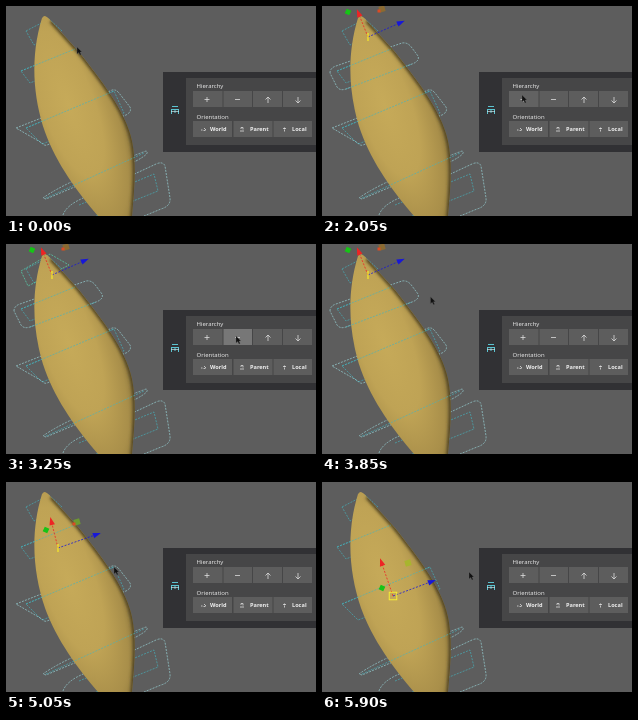
An HTML page for the animation above (6.05 s loop, 310 by 210 pixels).

```html
<!DOCTYPE html>
<html lang="en">
<head>
<meta charset="utf-8">
<title>Rig controls</title>
<style>
  html, body { margin: 0; width: 100%; height: 100%; overflow: hidden; background: #5d5d5d; }
  svg { display: block; width: 310px; height: 210px; }
  text { font: 6px "Open Sans", "Noto Sans", sans-serif; fill: #f0f0f0; }
  .label { font-weight: 700; font-size: 5.6px; }
  .ring { fill: none; stroke: #45b4bf; stroke-width: .65; stroke-dasharray: 2 1.2; }
  .outer { stroke: #9cdce0; }
  .selected { stroke: #55e0b8; }
  .icon { fill: none; stroke: #dcdcdc; stroke-width: .8; }
</style>
</head>
<body>
<svg viewBox="0 0 310 210">
  <defs>
    <radialGradient id="skin" gradientUnits="userSpaceOnUse" cx="0" cy="0" r="1"
      gradientTransform="translate(62 98) rotate(-20) scale(58 170)">
      <stop offset="0" stop-color="#c6aa59"/>
      <stop offset=".45" stop-color="#bfa355"/>
      <stop offset=".75" stop-color="#a98f4a"/>
      <stop offset="1" stop-color="#7a6735"/>
    </radialGradient>
    <clipPath id="body">
      <path id="shape" d="M38 10Q41 10 45 15L73 46C94 73 120 105 126 135C131 160 128 186 126 210H92C72 187 50 157 39 126C27 91 24 51 36 12Z"/>
    </clipPath>
    <filter id="soft"><feGaussianBlur stdDeviation="1.6"/></filter>
  </defs>
  <rect width="310" height="210" fill="#5d5d5d"/>

  <g class="ring">
    <path d="M20 25L43 13L56 25L28 39Z"/>
    <path d="M15 65L69 43L78 55L24 77Z"/>
    <path d="M20 122L108 85L118 107L36 138Z"/>
    <path d="M73 199L148 168L152 185L85 212"/>
  </g>
  <g class="ring outer">
    <path class="wide1 selected" d="M15 27L44 10L63 21L22 42Z"/>
    <path class="wide2" d="M8 67Q8 62 14 60L80 37Q86 36 90 42L96 50Q98 55 90 58L24 83Q18 85 15 81Z"/>
    <path class="wide3" d="M10 122L104 85Q109 82 113 87L124 101Q126 106 120 109L41 139Q38 140 36 137Z"/>
    <path d="M57 209Q60 200 75 193L150 158Q157 155 159 160L164 192Q165 200 155 203L138 210"/>
    <path d="M37 192Q60 175 140 145Q145 147 130 155L40 193Z"/>
  </g>

  <use href="#shape" fill="url(#skin)"/>
  <g clip-path="url(#body)">
    <path d="M45 15L73 46C94 73 120 105 126 135C131 160 128 186 126 215" fill="none" stroke="#4f4322" stroke-width="4" filter="url(#soft)"/>
  </g>

  <g class="ring">
    <path d="M15 65L69 43M20 122L108 85M40 192L138 147"/>
    <path class="wide2" d="M24 83L90 58"/>
  </g>

  <rect x="157" y="66" width="153" height="80" fill="#313134"/>
  <rect x="180" y="72" width="130" height="67" fill="#464647"/>
  <g fill="none" stroke="#5cc3d0">
    <path d="M166 100.500H172M165 103.500H173M165.500 104V108M169 104V107M172.500 104V108"/>
    <path d="M165 105.500H173" stroke="#c8e6e8" stroke-width=".7"/>
  </g>
  <text x="190.500" y="82">Hierarchy</text>
  <text x="190.500" y="113">Orientation</text>
  <g id="buttons"></g>

  <g id="gizmo" fill="none"></g>
  <path id="cursor" d="M0 0V7L1.700 5.500L3 8L4.200 7.400L3 5H5Z" fill="#111" stroke="#666" stroke-width=".3"/>
</svg>
<script>
const LOOP = 6050;
const $ = id => document.getElementById(id);

const button = (x, y, w, content) =>
  `<rect x="${x}" y="${y}" width="${w}" height="16" fill="#5d5d5d"/>${content}`;
const icon = d => `<path class="icon" d="${d}"/>`;
$('buttons').innerHTML =
  button(187, 85, 29.5, icon('M198.500 93.500h5M201 91v5')) +
  button(217.5, 85, 28.5, icon('M229 93.500h5')) +
  button(247, 85, 29, icon('M262 97v-6M259.500 93.500l2.500-2.500 2.500 2.500')) +
  button(277, 85, 29, icon('M292 91v6M289.500 94.500l2.500 2.500 2.500-2.500')) +
  button(187, 115, 39, icon('M195 124h1.500M198 122l2 2M197.500 124.500h2') + '<text class="label" x="204" y="125.200">World</text>') +
  button(227.5, 115, 39, icon('M234 125h4M235 123v-1.500h2v2') + '<text class="label" x="244" y="125.200">Parent</text>') +
  button(267.5, 115, 38.5, icon('M278.500 121.500v2M278.500 124v1.500M277 122.500h3') + '<text class="label" x="286" y="125.200">Local</text>');
const [plus, minus, , , world] = $('buttons').querySelectorAll('rect');

// Handle tips are offsets from the gizmo centre.
const gizmos = {
  middle: { at: [54, 68], red: [-8, -29], green: [-14, -19], blue: [38, -15], plane: [17, -31], fill: '#36b52e', boxed: true },
  top: { at: [46, 31], red: [-10, -25], green: [-20, -25], blue: [34, -15], plane: [14, -28], fill: '#8a6a32' },
  returned: { at: [52, 66], red: [-7, -28], green: [-12, -18], blue: [40, -14], plane: [19, -26], fill: '#6d9a30' },
  lower: { at: [71, 114], red: [-12, -35], green: [-11, -8], blue: [40, -15], plane: [15, -33], fill: '#a8b52e', boxed: true }
};

function arrow([x, y], color) {
  const angle = Math.atan2(y, x) * 180 / Math.PI;
  return `<path d="M0 0L${x} ${y}" stroke="${color}" stroke-width=".8" stroke-dasharray="2 1.500"/>
    <path transform="translate(${x} ${y}) rotate(${angle})" d="M3 0L-5 -2.800V2.800Z" fill="${color}"/>`;
}
const square = ([x, y], size, attrs) =>
  `<rect x="${x - size / 2}" y="${y - size / 2}" width="${size}" height="${size}" ${attrs}/>`;

function drawGizmo(g) {
  if (!g) return '';
  const centre = g.boxed
    ? square([0, 0], 7.5, 'stroke="#f5ee35"')
    : '<path d="M0 4V-4" stroke="#f5e62c" stroke-width="1.300"/>';
  return `<g transform="translate(${g.at})">` +
    arrow(g.red, '#ee2424') + arrow(g.blue, '#1717d8') +
    square(g.green, 5, `fill="#16c416" transform="rotate(25 ${g.green})"`) +
    square(g.plane, 6, `fill="${g.fill}" transform="rotate(-15 ${g.plane})"`) +
    (g.boxed ? '' : square([g.plane[0] - 3, g.plane[1] + 2], 3, 'fill="#dc4b24"')) +
    centre + '</g>';
}

// Cursor stops: time, x, y
const stops = [
  [0, 71, 41], [50, 71, 41], [350, 127, 68], [650, 127, 68], [1050, 170, 78],
  [1150, 209, 86], [1300, 209, 80], [1500, 44, 14], [1600, 44, 14], [1850, 209, 80],
  [2000, 209, 80], [2050, 200, 89], [2500, 209, 92], [3050, 209, 92], [3200, 230, 92],
  [3500, 230, 92], [4000, 75, 42], [4100, 75, 42], [4300, 203, 118], [4350, 203, 118],
  [4500, 230, 92], [4750, 118, 104], [5050, 108, 85], [5350, 108, 85], [5600, 230, 92],
  [5680, 230, 92], [5900, 147, 90], [LOOP, 147, 90]
];
function cursorAt(t) {
  const i = stops.findIndex(s => s[0] > t);
  const [t0, x0, y0] = stops[i - 1], [t1, x1, y1] = stops[i];
  const k = (t - t0) / (t1 - t0), e = k * k * (3 - 2 * k);
  return [x0 + (x1 - x0) * e, y0 + (y1 - y0) * e];
}

const between = (t, a, b) => t >= a && t < b;
const light = (rect, on, color) => rect.setAttribute('fill', on ? color : '#5d5d5d');
const show = (selector, on) => document.querySelectorAll(selector)
  .forEach(el => el.style.display = on ? '' : 'none');

let shown;
function frame(now) {
  const t = Math.floor(now % LOOP / 50) * 50;
  const name = t < 100 ? 'none' : t < 1550 ? 'middle' : t < 4150 ? 'top' : t < 5150 ? 'returned' : 'lower';
  if (name !== shown) {
    $('gizmo').innerHTML = drawGizmo(gizmos[shown = name]);
    document.querySelectorAll('.wide2')
      .forEach(el => el.classList.toggle('selected', name === 'middle' || name === 'returned'));
  }
  show('.wide1', between(t, 2100, 3500));
  show('.wide2', between(t, 1200, 4550));
  show('.wide3', t < 5650);
  light(plus, between(t, 1150, 1300) || between(t, 2050, 2500), '#626262');
  light(minus, between(t, 3150, 3600) || between(t, 4450, 4600) || between(t, 5550, 5750), '#777');
  light(world, between(t, 4250, 4450), '#777');
  $('cursor').setAttribute('transform', `translate(${cursorAt(t)})`);
  requestAnimationFrame(frame);
}
requestAnimationFrame(frame);
</script>
</body>
</html>
```
